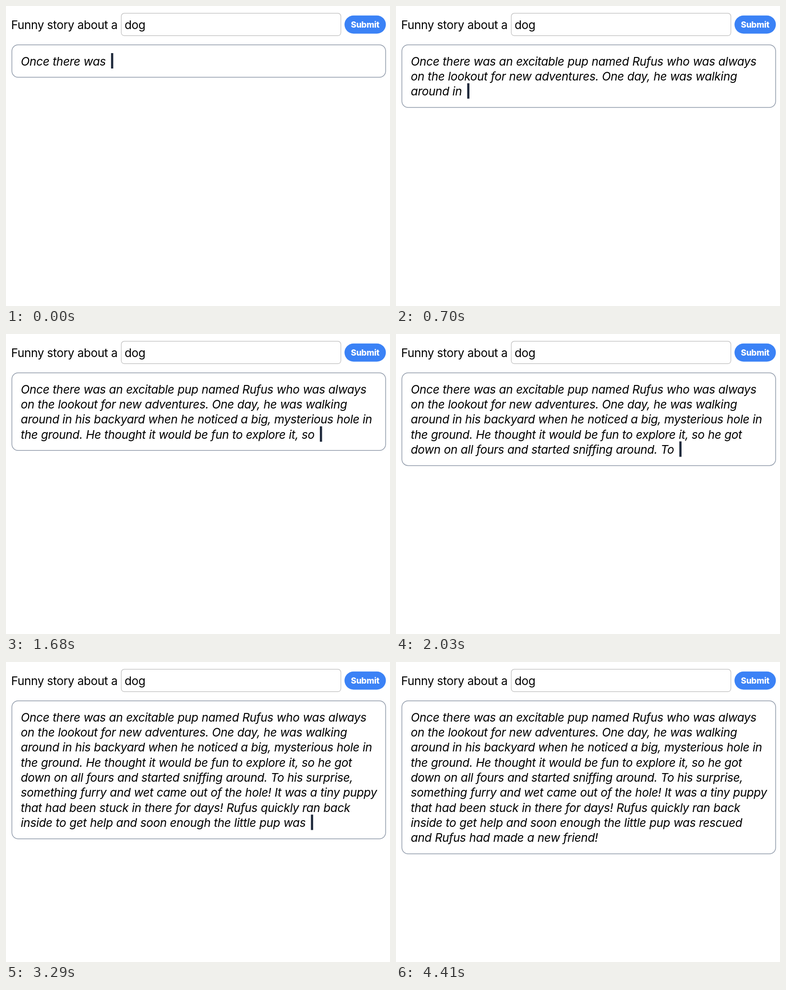
An HTML page for the animation above (4550 ms loop, 800 by 624 pixels).

```html
<!DOCTYPE html>
<html lang="en">
<head>
<meta charset="utf-8">
<title>Funny story</title>
<style>
  html, body { margin: 0; width: 100%; height: 100%; overflow: hidden; background: #fff; }
  svg { display: block; width: 800px; height: 624px; }
  text {
    font: 24.3px Inter, "Liberation Sans", sans-serif;
    font-optical-sizing: none;
    letter-spacing: -0.33px;
    white-space: pre;
  }
  #story text { font-style: italic; word-spacing: 0.4px; }
  #submit { font-size: 17.3px; font-weight: 800; letter-spacing: -0.25px; fill: #fff; text-anchor: middle; }
</style>
</head>
<body>
<svg viewBox="0 0 800 624" xmlns="http://www.w3.org/2000/svg">
  <text x="10.8" y="48">Funny story about a</text>
  <rect x="240.2" y="15.2" width="457.4" height="46.4" rx="6" fill="#fff" stroke="#bfbfbf" stroke-width="1.2"/>
  <text x="247" y="48">dog</text>
  <rect x="705.2" y="19.7" width="86.2" height="37.8" rx="18.9" fill="#3b82f6"/>
  <text id="submit" x="748.2" y="45">Submit</text>
  <rect id="box" x="12.3" y="80.7" width="778.6" rx="13" fill="none" stroke="#949ead" stroke-width="1.5"/>
  <g id="story"></g>
  <rect id="cursor" width="4.6" height="32" fill="#1e293b"/>
</svg>
<script>
const LOOP = 4550, STEP = 70, LAST_STEP = 63;
const LEFT = 30.8, BASELINE = 123.6, LINE = 31.35;
const CURSOR_OFF = 53;

const lines = [
  "Once there was an excitable pup named Rufus who was always",
  "on the lookout for new adventures. One day, he was walking",
  "around in his backyard when he noticed a big, mysterious hole in",
  "the ground. He thought it would be fun to explore it, so he got",
  "down on all fours and started sniffing around. To his surprise,",
  "something furry and wet came out of the hole! It was a tiny puppy",
  "that had been stuck in there for days! Rufus quickly ran back",
  "inside to get help and soon enough the little pup was rescued",
  "and Rufus had made a new friend!"
].map(line => line.split(" "));

// Pace of the stream: [step, words shown]
const pace = [[0, 3], [10, 24], [18, 34], [29, 57], [39, 78], [47, 96], [51, 104]];

const box = document.getElementById("box");
const story = document.getElementById("story");
const cursor = document.getElementById("cursor");

const rows = lines.map((_, i) => {
  const row = document.createElementNS("http://www.w3.org/2000/svg", "text");
  row.setAttribute("x", LEFT);
  row.setAttribute("y", BASELINE + i * LINE);
  return story.appendChild(row);
});

function wordsAt(step) {
  const next = pace.findIndex(([s]) => s > step);
  if (next < 0) return pace[pace.length - 1][1];
  const [s0, w0] = pace[next - 1], [s1, w1] = pace[next];
  return Math.floor(w0 + (w1 - w0) * (step - s0) / (s1 - s0));
}

function render(step) {
  let left = wordsAt(step), current = 0;
  lines.forEach((words, i) => {
    const shown = words.slice(0, Math.max(0, left));
    rows[i].textContent = shown.map(word => word + " ").join("");
    if (shown.length) current = i;
    left -= words.length;
  });
  box.setAttribute("height", 67.6 + current * LINE);
  cursor.setAttribute("x", LEFT + rows[current].getComputedTextLength() + 4.2);
  cursor.setAttribute("y", 98 + current * LINE);
  cursor.setAttribute("visibility", step < CURSOR_OFF ? "visible" : "hidden");
}

let drawn = -1;
function tick() {
  const step = Math.min(LAST_STEP, Math.floor(performance.now() % LOOP / STEP));
  if (step !== drawn) render(drawn = step);
  requestAnimationFrame(tick);
}
tick();
</script>
</body>
</html>
```
